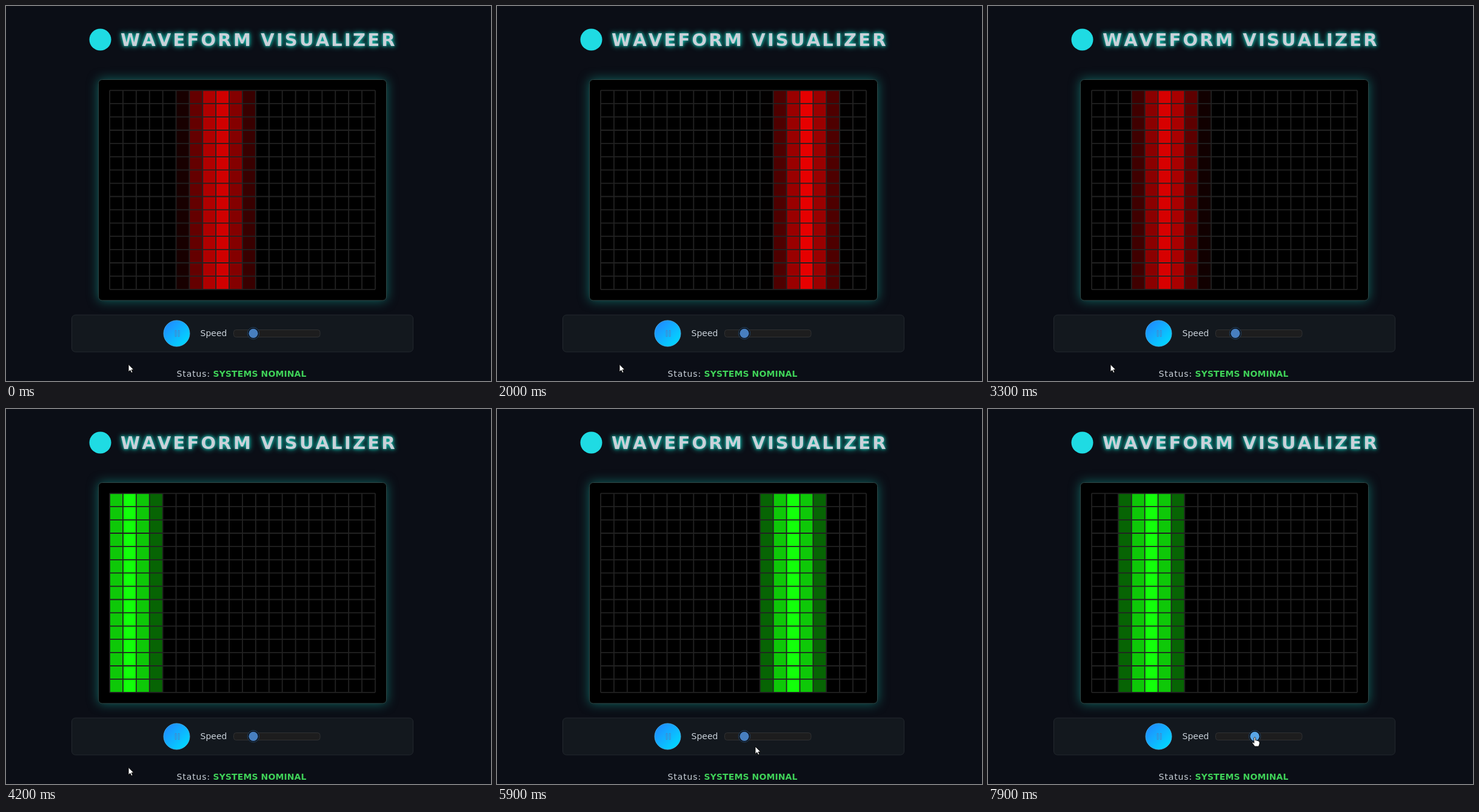
Recreate the animation shown at these times as an HTML page. Size 800 px wide and 619 px high, loop 8000 ms.

```html
<!DOCTYPE html>
<html lang="en">
<head>
<meta charset="utf-8">
<title>Waveform Visualizer</title>
<style>
  html, body { margin: 0; width: 100%; height: 100%; overflow: hidden; background: #0b0e16; }
  svg { display: block; width: 800px; height: 619px; }
  text { font: 14px "DejaVu Sans", sans-serif; font-kerning: none; fill: #c9d1d9; }
  #title { font-size: 29px; font-weight: bold; letter-spacing: 3.2px;
    filter: drop-shadow(0 0 2px #14b8a6) drop-shadow(0 0 4px #0f9f95); }
  #state { font-weight: bold; letter-spacing: .1px; fill: #3fd158; }
  #screen { fill: #000; stroke: #2f4544; filter: drop-shadow(0 0 9px rgba(20, 184, 166, .5)); }
</style>
</head>
<body>
<svg viewBox="0 0 800 619">
  <defs>
    <linearGradient id="blue" x1="0" y1="0" x2="1" y2="1">
      <stop offset=".15" stop-color="#1e90ff"/>
      <stop offset=".9" stop-color="#00d9ff"/>
    </linearGradient>
  </defs>

  <circle cx="155.5" cy="55.5" r="18" fill="#1fdbe3"/>
  <text id="title" x="189" y="66">WAVEFORM VISUALIZER</text>

  <rect id="screen" x="152.5" y="121.5" width="475" height="364.5" rx="6"/>
  <g id="columns"></g>
  <path id="lines" fill="none" stroke="#222" stroke-width="1.8"/>

  <rect x="108.5" y="510" width="563" height="61" rx="6" fill="#13181e" stroke="#23282e"/>
  <circle cx="281.5" cy="540.5" r="21.5" fill="url(#blue)" stroke="#4db8f5" stroke-width=".8"/>
  <path d="M279 535.5h2v10h-2zM284 535.5h2v10h-2z" fill="none" stroke="#4a86c8" stroke-width=".9"/>
  <text x="320.5" y="545">Speed</text>
  <rect x="375.5" y="534.5" width="142.5" height="12" rx="4" fill="#1d1d1e" stroke="#303133"/>
  <g id="thumb">
    <circle r="9.7" fill="#0d131c" stroke="#24425f"/>
    <circle id="knob" r="7.6"/>
  </g>

  <text x="281.5" y="612" letter-spacing=".9">Status:</text>
  <text id="state" x="341.5" y="612">SYSTEMS NOMINAL</text>

  <g id="cursor" fill="#fff" stroke="#000" stroke-width=".9" stroke-linejoin="round">
    <path id="arrow" d="M0 0V12.5L2.9 9.8 4.8 14 6.9 13 5 9H8.8Z"/>
    <path id="hand" d="M-1.2 1.2Q0-1 1.3 1.2V5.5Q3 4.6 3.8 6 5.4 5.3 6 6.8 8 6.3 8 8.6V11L6.5 15.5H0L-4 10Q-4.5 8-2.8 8.4L-1.2 10Z"/>
  </g>
</svg>
<script>
const LOOP = 8000, FRAME = 100;
const COLS = 20, ROWS = 15, CELL = 21.9, LEFT = 171, TOP = 139.3;
const SETTLE = 0.75;      // share of a tick spent sliding to the next column
const GRAB = 6300;        // moment the slider is clicked
const $ = id => document.getElementById(id);

// time, ticks passed
const ticks = [[0, 8.53], [2000, 23.8], [3300, 33.6], [4200, 39.9], [5900, 52.8],
  [6300, 55.84], [7000, 63.375], [7900, 72.9], [8000, 73.9]];
const pointerX = [[5200, 202], [5900, 426], [6200, 440]];
const pointerY = [[5200, 591.5], [5900, 557], [6200, 541.5]];

function along(points, t) {
  if (t <= points[0][0]) return points[0][1];
  for (let i = 1; i < points.length; i++) {
    const [t0, a] = points[i - 1], [t1, b] = points[i];
    if (t <= t1) return a + (b - a) * (t - t0) / (t1 - t0);
  }
  return points[points.length - 1][1];
}

function bounce(n) {
  const span = COLS - 1, m = n % (2 * span);
  return span - Math.abs(span - m);
}

const columns = Array.from({ length: COLS }, (_, i) => {
  const r = document.createElementNS("http://www.w3.org/2000/svg", "rect");
  Object.entries({ x: LEFT + i * CELL, y: TOP, width: CELL, height: ROWS * CELL })
    .forEach(([k, v]) => r.setAttribute(k, v));
  return $("columns").appendChild(r);
});

let grid = "";
for (let i = 0; i <= COLS; i++) grid += `M${LEFT + i * CELL} ${TOP}v${ROWS * CELL}`;
for (let j = 0; j <= ROWS; j++) grid += `M${LEFT} ${TOP + j * CELL}h${COLS * CELL}`;
$("lines").setAttribute("d", grid);

const move = (el, x, y) => el.setAttribute("transform", `translate(${x} ${y})`);
const show = (el, on) => el.setAttribute("visibility", on ? "visible" : "hidden");

function draw(t) {
  const n = along(ticks, t), whole = Math.floor(n);
  const pos = bounce(whole - 1 + Math.min(1, (n - whole) / SETTLE));
  const green = whole >= 2 * (COLS - 1);
  columns.forEach((col, i) => {
    const d = Math.abs(i - pos);
    const v = Math.max(0, green ? Math.min(255, 300 - 100 * d) : 230 - 76 * d);
    col.setAttribute("fill", green ? `rgb(${v * 0.07},${v},${v * 0.04})` : `rgb(${v},0,0)`);
  });

  const over = t >= 6200;
  move($("thumb"), t >= GRAB ? 440 : 408, 540.3);
  $("knob").setAttribute("fill", over ? "#58a6e8" : "#477fc0");
  move($("cursor"), along(pointerX, t), along(pointerY, t));
  show($("arrow"), !over);
  show($("hand"), over);
}

const start = performance.now();
function loop() {
  const t = (performance.now() - start) % LOOP;
  draw(Math.floor(t / FRAME) * FRAME);
  requestAnimationFrame(loop);
}
loop();
</script>
</body>
</html>
```
